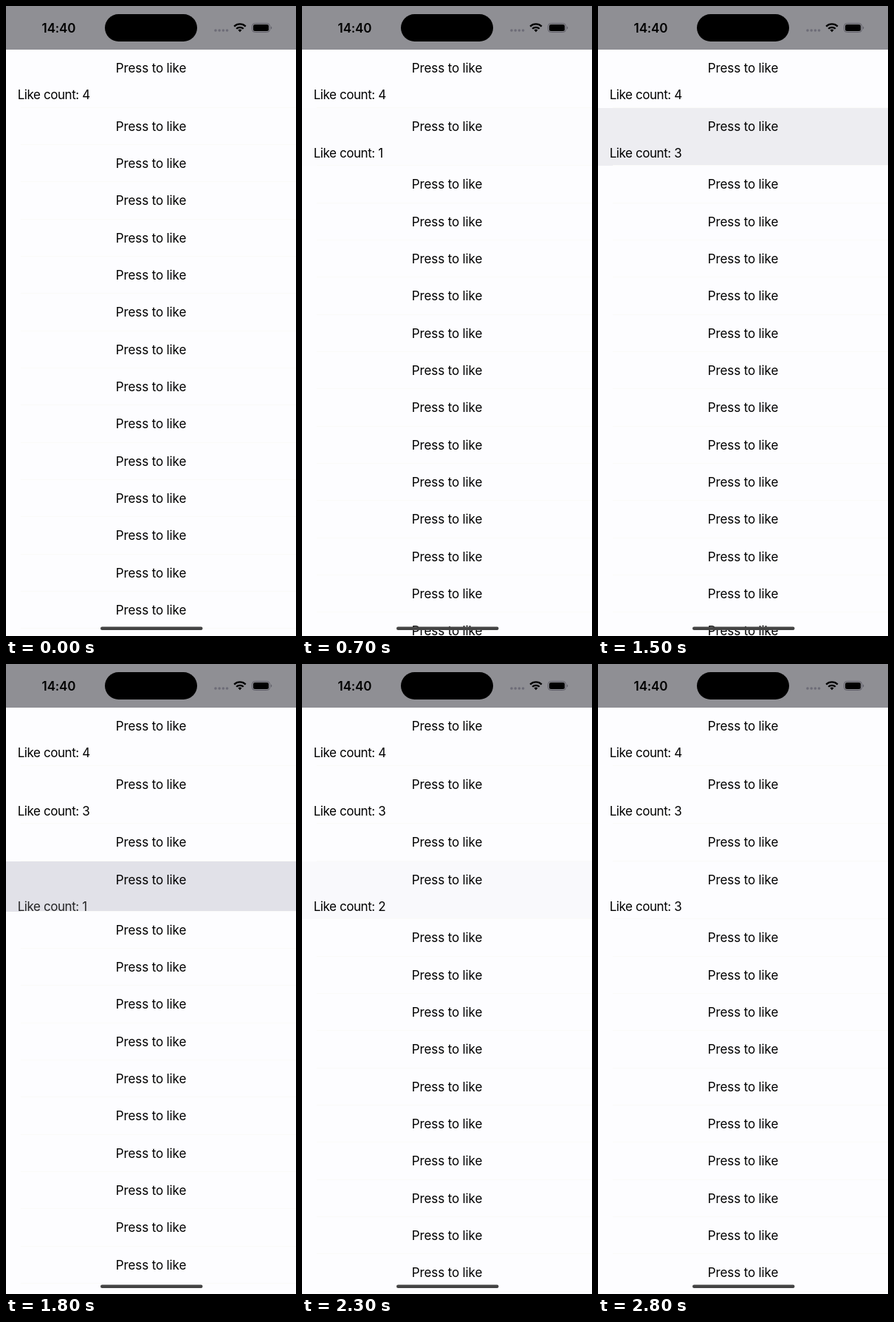
Write an HTML page that moves like this. It is 393 px wide and 852 px high and loops after 2900 ms.

```html
<!DOCTYPE html>
<html lang="en">
<head>
<meta charset="utf-8">
<style>
  html, body { margin: 0; width: 100%; height: 100%; overflow: hidden; background: #fdfdff; }
  body { position: relative; color: #000; font: 17px/20px Inter, sans-serif; letter-spacing: -.13px; }
  #list { position: absolute; top: 59px; width: 393px; }
  .row { position: relative; overflow: hidden; }
  .row::after { content: ""; position: absolute; left: 20px; right: 0; bottom: 0; height: 1px; background: #fafaf8; }
  .press { position: absolute; top: 15px; width: 100%; text-align: center; }
  .count { position: absolute; top: 51px; left: 15.7px; letter-spacing: -.43px; }
  svg { position: absolute; left: 0; top: 0; }
</style>
</head>
<body>
<div id="list"></div>
<svg width="393" height="852">
  <rect width="393" height="59" fill="#8f8f94"/>
  <text x="71.5" y="35.5" text-anchor="middle" font-weight="600">14:40</text>
  <rect x="134" y="11" width="125" height="37" rx="18.5"/>
  <path d="M284 33h16" stroke="#6d6c77" stroke-width="3.6" stroke-linecap="round" stroke-dasharray="0 5.2"/>
  <g fill="none" stroke="#000" stroke-width="2.3">
    <path d="M309.2 27.6a11.2 11.2 0 0 1 15.6 0M312.2 30.8a6.8 6.8 0 0 1 9.6 0"/>
  </g>
  <path d="M317 35.2l-2.5-2.6a3.6 3.6 0 0 1 5 0z"/>
  <rect x="333.5" y="23.5" width="24" height="12" rx="3.8" fill="none" stroke="#5e5d67"/>
  <rect x="335" y="25" width="21" height="9" rx="2.5"/>
  <path d="M359 27.5a2.2 2.2 0 0 1 0 4z" fill="#5e5d67"/>
  <rect x="128" y="839.5" width="138.5" height="4.5" rx="2.2" fill="#444"/>
</svg>
<script>
const LOOP = 2900, STEP = 100;
const ROW = 50.333, EXTRA = 28.333;
const GROW_MS = 258, FADE_MS = 400;
const taps = { 1: [310, 820, 1250], 3: [1650, 1940, 2380] };

const clamp = v => Math.max(0, Math.min(1, v));
const ease = v => v * v * (3 - 2 * v);

const rows = Array.from({ length: 17 }, () => {
  const add = (parent, name) => {
    const el = document.createElement("div");
    el.className = name;
    return parent.appendChild(el);
  };
  const box = add(document.getElementById("list"), "row");
  add(box, "press").textContent = "Press to like";
  return { box, count: add(box, "count") };
});

function draw(t) {
  rows.forEach(({ box, count }, i) => {
    const past = (taps[i] || []).filter(start => start <= t);
    const likes = i === 0 ? 4 : past.length;
    const open = i === 0 ? 1 : past.length ? ease(clamp((t - past[0]) / GROW_MS)) : 0;
    const glow = past.length ? clamp(1 - (t - past.at(-1)) / FADE_MS) : 0;
    box.style.height = ROW + EXTRA * open + "px";
    box.style.background = `rgba(209, 209, 218, ${glow})`;
    count.textContent = likes ? "Like count: " + likes : "";
    count.style.opacity = clamp(open * 1.35);
  });
}

function tick() {
  const t = performance.now() % LOOP;
  draw(Math.floor(t / STEP) * STEP);
  requestAnimationFrame(tick);
}
tick();
</script>
</body>
</html>
```
